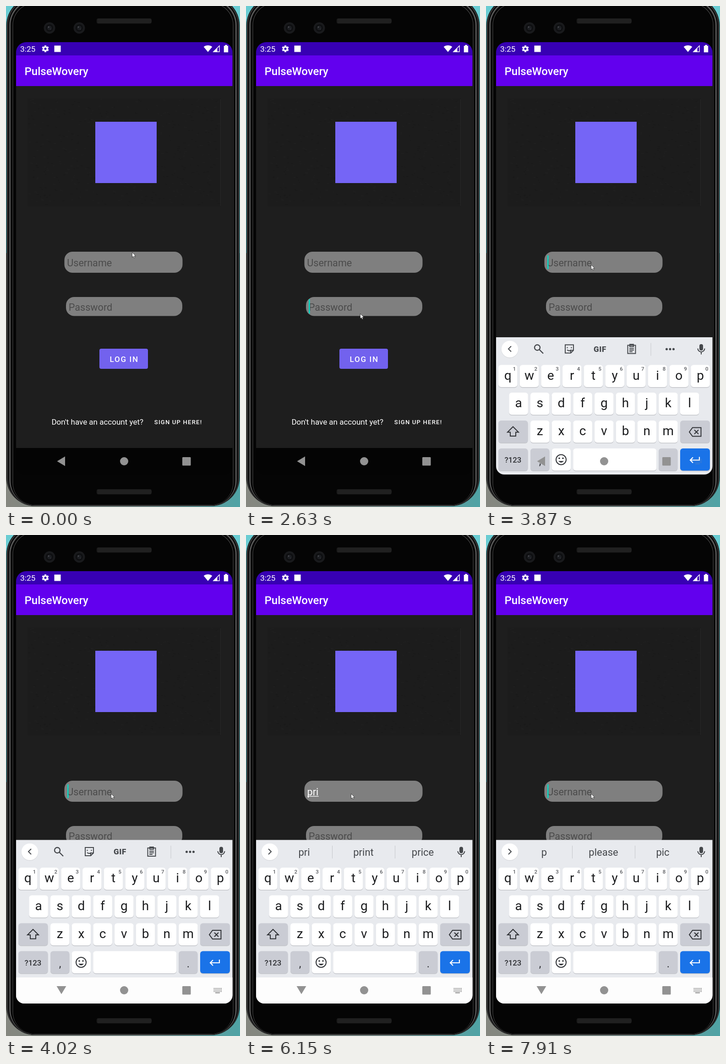
An HTML page with a canvas for the animation above (8 s loop, 511 by 1095 pixels).

```html
<!DOCTYPE html>
<html lang="en">
<head>
<meta charset="utf-8">
<title>Log in</title>
<style>
html, body { margin: 0; width: 100%; height: 100%; overflow: hidden; background: #000; }
canvas { display: block; width: 511px; height: 1095px; }
</style>
</head>
<body>
<canvas id="stage" width="511" height="1095"></canvas>
<script>
const W = 511, H = 1095, LOOP = 8000;
const FONT = 'Roboto, "Noto Sans", sans-serif';
const APP = 'PulseWovery';
const FIELD = 21.64;
const ctx = document.getElementById('stage').getContext('2d');
let g = ctx;

// Each entry changes part of the state from its time on.
const steps = [
  [0, { x: 275, y: 538, user: false, pass: false, kb: 'off', bar: null, text: '', line: 0 }],
  [260, { x: 273, y: 612, pass: true }],
  [400, { x: 266, y: 755 }],
  [540, { x: 262, y: 869 }],
  [820, { x: 282, y: 950, pass: false }],
  [950, { x: 312, y: 1040 }],
  [1080, { x: 340, y: 1110, pass: true }],
  [1580, { pass: false }],
  [2100, { x: 331, y: 1050, pass: true }],
  [2230, { x: 259, y: 704 }],
  [2510, { x: 249, y: 672 }],
  [2640, { x: 241, y: 630, pass: false }],
  [2780, { x: 235, y: 596 }],
  [2920, { x: 231, y: 578 }],
  [3060, { x: 229, y: 571, pass: true }],
  [3200, { y: 568 }],
  [3330, { y: 566 }],
  [3470, { y: 565 }],
  [3600, { pass: false, user: true }],
  [3720, { kb: 'wait' }],
  [3870, { kb: 'rise' }],
  [4020, { kb: 'up' }],
  [4170, { user: false }],
  [4440, { user: true, text: 'p', line: 0 }],
  [4570, { bar: ['p', 'please', 'pic'], line: 1 }],
  [4940, { user: false }],
  [5220, { user: true, text: 'pr', line: 2, bar: ['pr', 'or', 'probably'] }],
  [5340, { text: 'pri' }],
  [5620, { line: 3, bar: ['pri', 'print', 'price'] }],
  [6150, { user: false }],
  [6550, { user: true }],
  [6950, { text: 'prin' }],
  [7080, { line: 4, bar: ['prin', 'print', 'prince'] }],
  [7340, { text: 'pri', line: 3 }],
  [7480, { text: 'pr', line: 2, bar: ['pri', 'print', 'price'] }],
  [7610, { text: 'p', line: 1, bar: ['pr', 'or', 'probably'] }],
  [7910, { text: '', line: 0, bar: ['p', 'please', 'pic'] }]
];

function stateAt(t) {
  const s = {};
  for (const [at, change] of steps) if (at <= t) Object.assign(s, change);
  return s;
}

function rect(x, y, w, h, color) {
  g.fillStyle = color;
  g.fillRect(x, y, w, h);
}

function round(x, y, w, h, r, color) {
  g.fillStyle = color;
  g.beginPath();
  g.roundRect(x, y, w, h, r);
  g.fill();
}

function disc(x, y, r, color) {
  g.fillStyle = color;
  g.beginPath();
  g.arc(x, y, r, 0, Math.PI * 2);
  g.fill();
}

function label(text, x, y, size, color, { weight = 400, align = 'left', gap = 0 } = {}) {
  g.font = `${weight} ${size}px ${FONT}`;
  g.textAlign = align;
  g.letterSpacing = gap + 'px';
  g.fillStyle = color;
  g.fillText(text, x, y);
}

// Path data is given around the centre of the icon.
function icon(x, y, path, color, width = 0) {
  const p = new Path2D(path);
  g.save();
  g.translate(x, y);
  if (width) {
    g.strokeStyle = color;
    g.lineWidth = width;
    g.stroke(p);
  } else {
    g.fillStyle = color;
    g.fill(p);
  }
  g.restore();
}

function screenPath() {
  g.beginPath();
  g.roundRect(22, 79, 472.5, 945, [22, 22, 18, 18]);
}

// One layer of the phone body, a given distance in from its edge.
function shell(inset, color) {
  round(1 + inset, -20 + inset, 509 - 2 * inset, 1113 - 1.2 * inset, 62 - inset, color);
}

function phone() {
  rect(0, 0, W, 540, '#6accd2');
  const shore = g.createLinearGradient(0, 0, W, 0);
  shore.addColorStop(0, '#85877f');
  shore.addColorStop(0.6, '#7c918f');
  shore.addColorStop(1, '#4fa3a5');
  rect(0, 540, W, 555, shore);
  shell(0, '#0b0b0b');
  shell(1.5, '#4a4a4a');
  shell(3, '#0e0e0e');
  shell(6.5, '#686868');
  shell(8.5, '#1c1c1c');
  shell(10, '#000');
  shell(13, '#3a3a3a');
  shell(14.5, '#050505');
  for (const y of [27, 1056]) {
    round(198, y, 120, 11.5, 4, '#1c1c1c');
    for (let x = 201; x < 316; x += 3)
      for (let k = 0; k < 3; k++) rect(x + k % 2, y + 2 + k * 3, 1.4, 1.4, '#303030');
  }
  for (const x of [95, 160]) {
    disc(x, 48, 12.5, '#191a1c');
    disc(x, 48, 8, '#0e0f11');
    disc(x, 48, 5, '#1c1e22');
    disc(x - 2, 46, 1.5, '#4a4c50');
    disc(x + 2.5, 50.5, 1, '#35373b');
  }
}

function statusBar() {
  rect(22, 79, 473, 29, '#3700b3');
  label('3:25', 31, 99.5, 17.3, '#fff');
  g.save();
  g.translate(86, 93.5);
  for (let i = 0; i < 6; i++) {
    g.rotate(Math.PI / 3);
    rect(-2, -7.5, 4, 5, '#fff');
  }
  disc(0, 0, 5.6, '#fff');
  disc(0, 0, 2.5, '#3700b3');
  g.restore();
  rect(105.5, 86.5, 14, 14, '#fff');
  icon(441, 100.5, 'M0 0L-9.3 -11.3C-4 -15.5 4 -15.5 9.3 -11.3Z', '#fff');
  icon(459.5, 93.5, 'M-6.5 6.5L6.5 -6.5V6.5Z', '#fff', 1.4);
  icon(459.5, 93.5, 'M-7 7L2 -2V7Z', '#fff');
  icon(480.5, 93.5, 'M-4.7 -6.5H-2V-8.5H2V-6.5H4.7V7.7H-4.7Z', '#fff');
}

function panel() {
  rect(47, 202, 422, 236, '#1c1c1c');
  let seed = 17;
  const rnd = () => (seed = (seed * 16807) % 2147483647) / 2147483647;
  g.lineWidth = 1;
  for (let i = 0; i < 520; i++) {
    const x = 48 + rnd() * 414, y = 203 + rnd() * 232;
    g.strokeStyle = rnd() < 0.5 ? '#222' : '#181818';
    g.beginPath();
    g.moveTo(x, y);
    g.lineTo(x + 2 + rnd() * 4, y + rnd() * 3 - 1);
    g.stroke();
  }
  rect(468, 204, 1, 233, '#272727');
  rect(195, 253, 134, 134, '#7565f6');
}

function page() {
  rect(22, 175, 473, 791, '#1e1e1e');
  rect(22, 108, 473, 67, '#6200ee');
  label(APP, 40.5, 151, 24, '#fff', { weight: 500 });
  panel();
  round(127.5, 537, 258, 46, 18, '#7f7f7f');
  round(131, 636, 254, 41.5, 18, '#7f7f7f');
  label('Password', 136.7, 665.5, FIELD, '#4b4b4b');
  round(204, 749, 106, 44, 4, '#7262ee');
  label('LOG IN', 226.6, 778, 17, '#fff', { weight: 500, gap: 1.7 });
  label("Don't have an account yet?", 99.4, 914.5, 17, '#fff');
  label('SIGN UP HERE!', 323.8, 913.5, 13.2, '#fff', { weight: 500, gap: 1.14 });
  rect(22, 966, 473, 58, '#040404');
}

function key(x, y, w, color = '#fff') {
  round(x, y + 1.5, w, 48.5, 6, '#c3c5ca');
  round(x, y, w, 48.5, 6, color);
}

function letters(chars, x, y, hints) {
  [...chars].forEach((c, i) => {
    const kx = x + i * 46.7;
    key(kx, y, 41.5);
    label(c, kx + 20.7, y + 32, 28, '#1b1c1e', { align: 'center' });
    if (hints) label(hints[i], kx + 35, y + 12.5, 11.5, '#5a5c60', { weight: 500, align: 'center' });
  });
}

function tools() {
  const c = '#45484c';
  icon(52, 692, 'M3 -6L-3 0L3 6', c, 2);
  icon(115, 692, 'M-9 -3A6 6 0 1 0 3 -3A6 6 0 1 0 -9 -3M1.5 1.5L10 10', c, 2.4);
  icon(182, 692, 'M-9 -9H9V3L3 9H-9ZM9 3H3V9M-4.5 -4V-1.5M4.5 -4V-1.5M-5 2Q0 6 4 2', c, 2);
  label('GIF', 249, 698, 17, c, { weight: 900, align: 'center', gap: 0.6 });
  icon(318, 692, 'M-8.5 -8H8.5V10H-8.5ZM-4 -10H4V-5H-4ZM-5 -1H5M-5 2.5H5M-5 6H2', c, 2);
  rect(359.5, 679, 1, 28, '#c6c8cc');
  for (const x of [394.5, 402, 409.5]) disc(x, 692.5, 2.5, c);
}

function suggestions(words) {
  icon(52, 692, 'M-3 -6L3 0L-3 6', '#45484c', 2);
  words.forEach((w, i) => label(w, 127 + i * 129.5, 701, 22, '#44474b', { align: 'center' }));
  rect(188, 679, 1, 28, '#c6c8cc');
  rect(325, 679, 1, 28, '#c6c8cc');
}

function keyboard(shift, words) {
  const dark = '#caccd4', ink = '#303236';
  g.save();
  g.translate(0, shift);
  rect(22, 666.5, 473, 358, '#e8eaee');
  disc(52, 693.5, 18.5, '#d3d5d9');
  disc(52, 692.5, 18.3, '#fff');
  if (words) suggestions(words);
  else tools();
  round(466, 681.5, 8, 14, 4, '#45484c');
  icon(470, 692, 'M-7.5 -1A7.5 7.5 0 0 0 7.5 -1M0 6.5V12', '#45484c', 2);
  letters('qwertyuiop', 27, 727, '1234567890');
  letters('asdfghjkl', 50.3, 787.5);
  letters('zxcvbnm', 97, 848.5);
  key(27, 848.5, 64.5, dark);
  key(424, 848.5, 65, dark);
  key(27, 909.5, 64.5, dark);
  key(97, 909.5, 41.5, dark);
  key(143.6, 909.5, 41.5);
  key(190.3, 909.5, 182);
  key(377, 909.5, 41.5, dark);
  key(424, 909.5, 65, '#1a73e8');
  icon(59, 872.5, 'M0 -10.5L12 1.5H6V10H-6V1.5H-12Z', ink, 2);
  icon(457, 873.5, 'M-13 0L-6 -9.5H12.5V9.5H-6ZM-2 -4.5L7 4.5M7 -4.5L-2 4.5', ink, 2);
  label('?123', 59, 940.5, 16.8, ink, { weight: 500, align: 'center' });
  label(',', 118, 945, 24, ink, { align: 'center' });
  label('.', 398, 945, 24, ink, { align: 'center' });
  icon(164, 934, 'M11 0A11 11 0 1 1 -11 0A11 11 0 1 1 11 0', ink, 2);
  disc(160, 931, 1.8, ink);
  disc(168, 931, 1.8, ink);
  icon(164, 934, 'M-6 3Q0 10 6 3Z', ink);
  icon(456, 934, 'M10 -6V1H-9M-4 -5L-10 1L-4 7', '#fff', 2.2);
  g.restore();
}

function navIcons(kb) {
  const c = '#929292';
  icon(121, 995, kb === 'up' ? 'M-10.5 -9H10.5L0 8.5Z' : 'M-9.5 0L8 -10.5V10.5Z', c);
  disc(258, 995, 9, c);
  round(385, 986, 18.5, 18.5, 1.5, c);
  if (kb === 'off') return;
  g.globalAlpha = kb === 'rise' ? 0.25 : 1;
  for (let row = 0; row < 3; row++)
    for (let i = 0; i < 6; i++) rect(453.5 + i * 3.1, 990 + row * 3.3, 2, 2, c);
  rect(457, 999.6, 10, 2, c);
  g.globalAlpha = 1;
}

function entry(s) {
  if (!s.text) label('Username', 133.2, 569, FIELD, '#4b4b4b');
  label(s.text, 133.6, 569, FIELD, '#fff');
  const width = n => g.measureText(s.text.slice(0, n)).width;
  if (s.line) rect(134, 570.5, width(s.line), 1.3, '#fff');
  if (s.user) rect(134 + Math.floor(width(s.text.length)), 545, 2.6, 30, '#03dac5');
  if (s.pass) rect(137, 641, 2.6, 31, '#03dac5');
}

function pointer(x, y) {
  const path = 'M0.5 0.5V11.2L3 9L4.8 12.8L6.6 12L4.9 8.3H8.3Z';
  icon(x, y, path, '#fff');
  icon(x, y, path, '#2b2b2b', 0.8);
}

function makeBackdrop() {
  const layer = document.createElement('canvas');
  layer.width = W;
  layer.height = H;
  g = layer.getContext('2d');
  phone();
  g.save();
  screenPath();
  g.clip();
  page();
  statusBar();
  g.restore();
  g = ctx;
  return layer;
}

const backdrop = makeBackdrop();

function draw(s) {
  g.drawImage(backdrop, 0, 0);
  g.save();
  screenPath();
  g.clip();
  entry(s);
  if (s.kb === 'rise') keyboard(57.5, s.bar);
  if (s.kb === 'up') {
    keyboard(0, s.bar);
    rect(22, 967, 473, 57, '#fdfdfd');
  }
  navIcons(s.kb);
  g.restore();
  pointer(s.x, s.y);
}

const start = performance.now();
function tick(now) {
  draw(stateAt(Math.max(0, now - start) % LOOP));
  requestAnimationFrame(tick);
}
tick(start);
</script>
</body>
</html>
```
